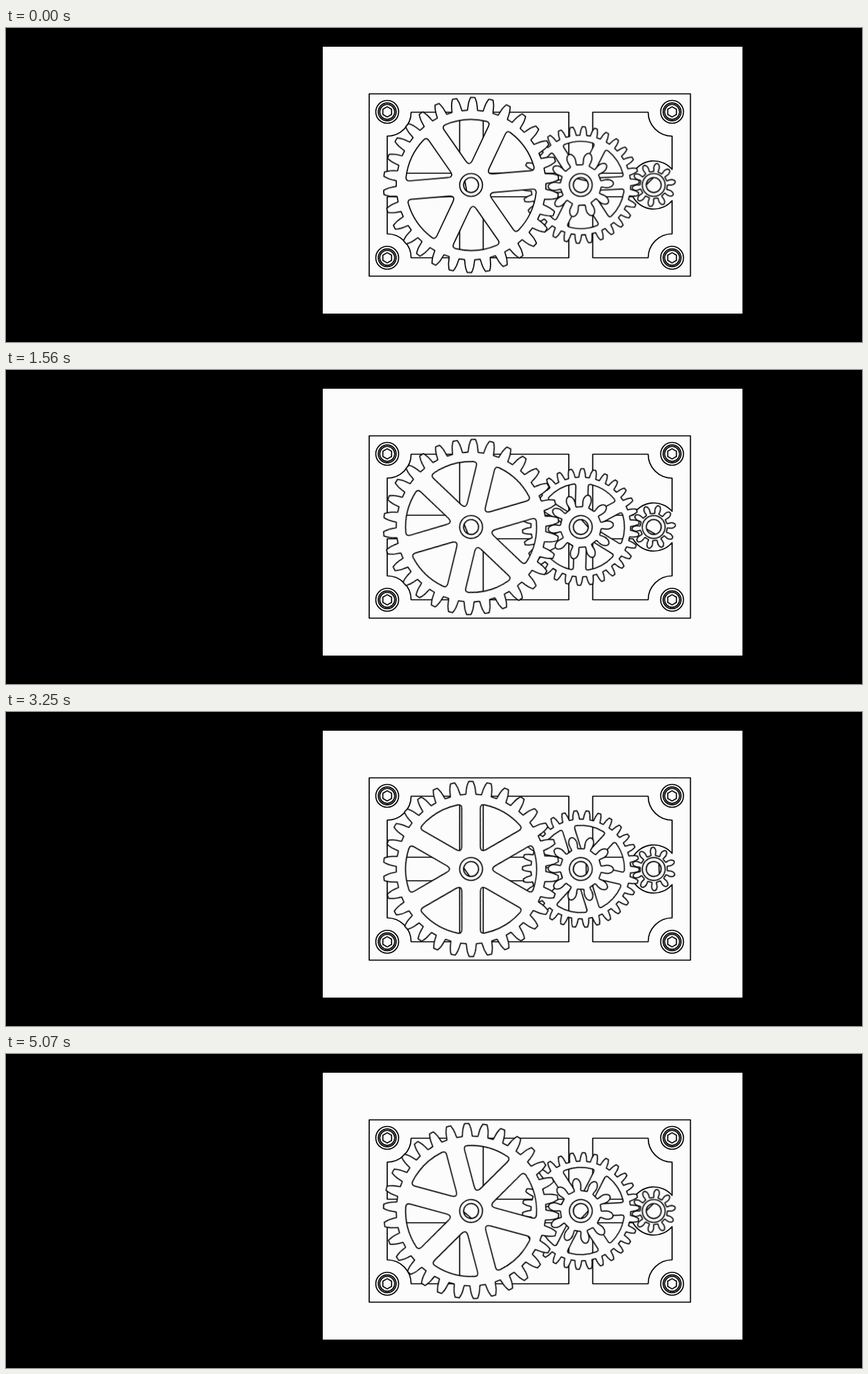
Recreate the animation shown at these times as an HTML page. Size 1235x453 px, loop 5200 ms.

```html
<!DOCTYPE html>
<html lang="en">
<head>
<meta charset="utf-8">
<title>Gear train</title>
<style>
  html, body { margin: 0; width: 100%; height: 100%; overflow: hidden; background: #000; }
  svg { display: block; width: 1235px; height: 453px; }
  .ink { fill: #fcfcfc; stroke: #000; stroke-width: 1.65; stroke-linejoin: round; fill-rule: evenodd; }
  .line { fill: none; }
  .spin { transform-origin: 0 0; animation: turn 5200ms infinite; }
  /* one hold, then 38 equal steps */
  @keyframes turn {
    0% { transform: rotate(0deg); animation-timing-function: linear; }
    5% { transform: rotate(0deg); animation-timing-function: steps(38, start); }
    100% { transform: rotate(var(--turn)); }
  }
</style>
</head>
<body>
<svg viewBox="0 0 1235 453">
  <defs>
    <path id="windows" class="line" d="
      M654.5 121.5H584.5A34.5 34.5 0 0 1 550 156V209.5H654.5Z
      M688.5 121.5H812V209.5H688.5Z
      M846.5 121.5H926.5A34.5 34.5 0 0 0 961 156V204A34.5 34.5 0 0 0 904.5 209.5H846.5Z"/>
    <g id="screw">
      <circle r="16.5"/>
      <circle r="12.9"/>
      <circle r="10.8"/>
      <path d="M0 -7.4L6.3 -3.7V3.7L0 7.4L-6.3 3.7V-3.7Z"/>
    </g>
  </defs>
  <rect x="457" y="27" width="605.5" height="385" fill="#fcfcfc"/>
  <g class="ink">
    <rect x="524" y="95" width="463.5" height="263"/>
    <use href="#windows"/>
    <use href="#windows" transform="translate(0 453) scale(1 -1)"/>
    <use href="#screw" x="550" y="121"/>
    <use href="#screw" x="961" y="121"/>
    <use href="#screw" x="550" y="331.5"/>
    <use href="#screw" x="961" y="331.5"/>
    <g id="gears"></g>
  </g>
</svg>
<script>
  // Tooth flanks from root to tip: [radius, half width in degrees]
  const WHEEL = [[108, 3.9], [110, 3.65], [114, 3.3], [118.5, 2.85], [123, 2.1], [126.4, 1.4]];
  const PINION = [[29.5, 9.5], [31, 8.6], [34, 8.9], [37, 9], [40, 8.4], [43, 6.7], [45.5, 4.4], [47, 1.6]];
  const SMALL = 0.666;

  // Angles run clockwise from the top
  const polar = (r, deg) => {
    const a = deg * Math.PI / 180;
    return `${(r * Math.sin(a)).toFixed(2)} ${(-r * Math.cos(a)).toFixed(2)}`;
  };

  function rim(count, flank, scale, phase) {
    const points = [];
    for (let i = 0; i < count; i++) {
      const mid = phase + i * 360 / count;
      flank.forEach(([r, half]) => points.push(polar(r * scale, mid - half)));
      [...flank].reverse().forEach(([r, half]) => points.push(polar(r * scale, mid + half)));
    }
    return `M${points.join('L')}Z`;
  }

  // Six rounded openings between straight spokes
  function openings(scale, phase) {
    const outer = 94.5 * scale, half = 13.4 * scale, round = 6 * scale, inner = 10 * scale;
    const apex = half * 2;
    const deg = 180 / Math.PI;
    const edge = 30 - Math.asin(half / outer) * deg;
    const trim = round / outer * deg;
    const along = (d, side) => {
      const x = side * d / 2, y = apex + d * Math.sqrt(3) / 2;
      return [Math.hypot(x, y), Math.atan2(x, y) * deg];
    };
    const length = Math.sqrt(outer * outer - half * half) - half * Math.sqrt(3);
    let d = '';
    for (let i = 0; i < 6; i++) {
      const mid = phase + i * 60;
      const at = (r, a) => polar(r, mid + a);
      const on = (dist, side) => at(...along(dist, side));
      d += `M${on(inner, -1)}L${on(length - round, -1)}Q${at(outer, -edge)} ${at(outer, trim - edge)}` +
        `A${outer} ${outer} 0 0 1 ${at(outer, edge - trim)}Q${at(outer, edge)} ${on(length - round, 1)}` +
        `L${on(inner, 1)}Q${at(apex, 0)} ${on(inner, -1)}Z`;
    }
    return d;
  }

  const wheel = (scale, phase) => `<path d="${rim(30, WHEEL, scale, phase + 5.9)}${openings(scale, phase)}"/>`;
  const pinion = (scale, phase) => `<path d="${rim(10, PINION, scale, phase)}"/>`;
  const hub = flat =>
    `<circle r="16.5"/><circle r="10.8"/><path d="M${polar(10.8, flat - 44)}L${polar(10.8, flat + 44)}"/>`;
  const gear = (x, turn, body) =>
    `<g transform="translate(${x} 226.5)"><g class="spin" style="--turn:${turn}deg">${body}</g></g>`;

  document.getElementById('gears').innerHTML =
    gear(934.5, -360, pinion(SMALL, 9.3) + hub(-45)) +
    gear(829.3, 120, wheel(SMALL, -3) + pinion(1, 15) + hub(14)) +
    gear(671, -40, wheel(1, -4.8) + hub(-100));
</script>
</body>
</html>
```
